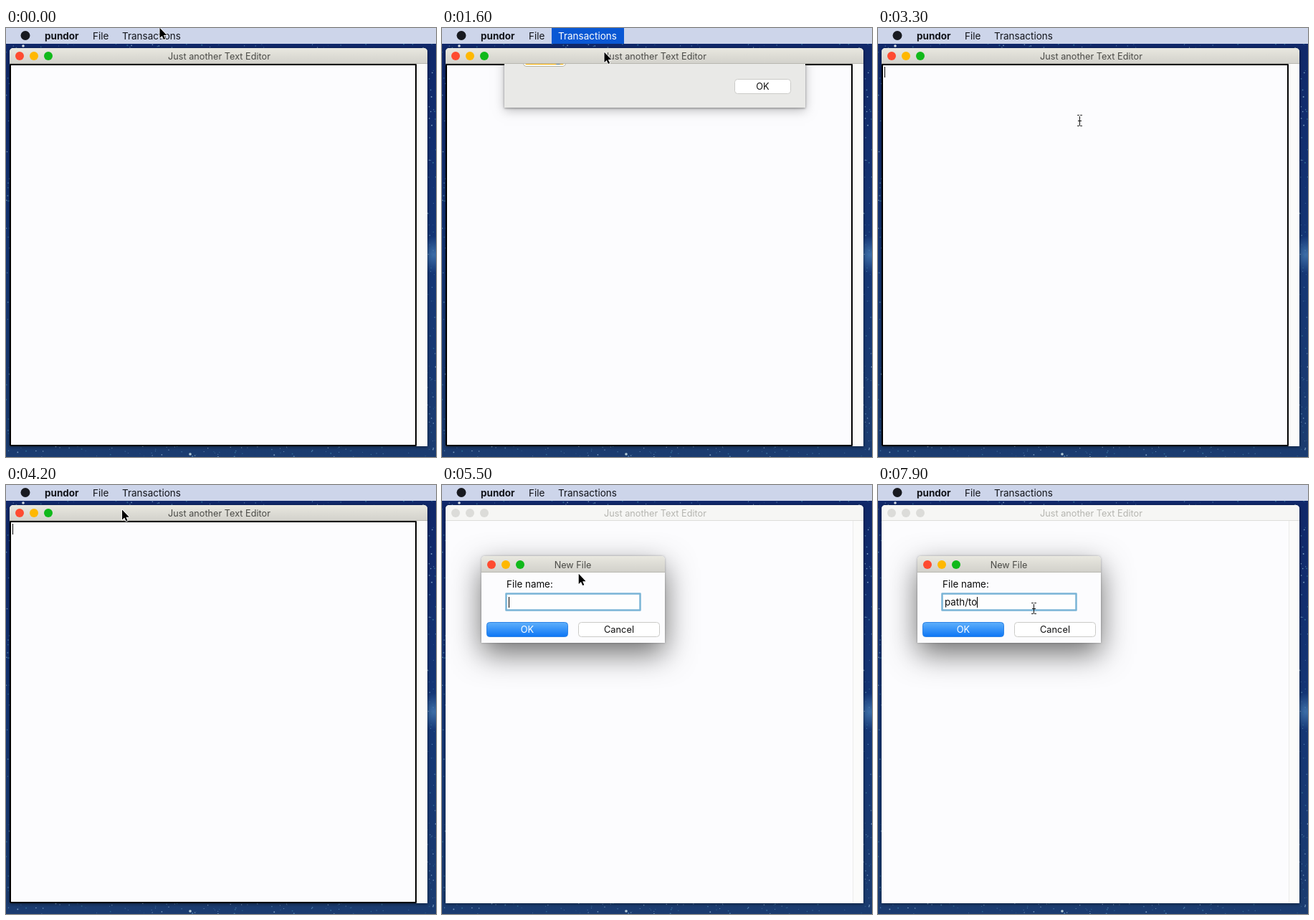
An HTML page with a canvas that plays this animation: 600 by 598 pixels, repeating every 8 s.

```html
<!DOCTYPE html>
<html lang="en">
<head>
<meta charset="utf-8">
<title>Text Editor</title>
<style>
  html, body { margin: 0; width: 100%; height: 100%; overflow: hidden; background: #14346f; }
  canvas { display: block; }
</style>
</head>
<body>
<canvas id="stage" width="600" height="598"></canvas>
<script>
const c = document.getElementById('stage').getContext('2d');
const LOOP = 8000, STEP = 100;

// Pointer stops: time, x, y
const path = [
  [0, 214, -1], [300, 214, 9], [600, 214, 9], [1000, 226, 33], [1900, 226, 33],
  [2500, 461, 153], [2800, 461, 153], [3300, 281, 129], [3700, 281, 129],
  [4400, 132, 10], [4600, 132, 10], [4800, 141, 33], [5200, 141, 33],
  [5700, 217, 172], [LOOP, 217, 172]
];
const typed = 'path/to', keyTimes = [5600, 5700, 5900, 6000, 7000, 7300, 7500];

const within = (t, from, to) => t >= from && t < to;
const clamp = v => Math.max(0, Math.min(1, v));

function pointerAt(t) {
  const i = path.findIndex(p => p[0] > t);
  const [t0, x0, y0] = path[i - 1], [t1, x1, y1] = path[i];
  const u = (t - t0) / (t1 - t0), e = u * u * (3 - 2 * u);
  return [x0 + (x1 - x0) * e, y0 + (y1 - y0) * e];
}

function rect(x, y, w, h, fill) {
  c.fillStyle = fill;
  c.fillRect(x, y, w, h);
}

function box(x, y, w, h, r, fill, stroke) {
  c.beginPath();
  c.roundRect(x, y, w, h, r);
  c.fillStyle = fill;
  c.fill();
  if (stroke) { c.strokeStyle = stroke; c.lineWidth = 1; c.stroke(); }
}

function dot(x, y, r, fill) {
  c.beginPath();
  c.arc(x, y, r, 0, 7);
  c.fillStyle = fill;
  c.fill();
}

function text(s, x, y, size, fill, align = 'left', weight = 400) {
  c.font = `${weight} ${size}px Inter, "Open Sans", sans-serif`;
  c.textAlign = align;
  c.fillStyle = fill;
  c.fillText(s, x, y);
}

function vertical(y0, y1, ...colors) {
  const g = c.createLinearGradient(0, y0, 0, y1);
  colors.forEach((col, i) => g.addColorStop(i / (colors.length - 1), col));
  return g;
}

function shadowed(color, blur, dy, draw) {
  c.save();
  c.shadowColor = color;
  c.shadowBlur = blur;
  c.shadowOffsetY = dy;
  draw();
  c.restore();
}

function sky() {
  rect(0, 0, 600, 598, vertical(22, 598, '#10286a', '#143676', '#1b3c70'));
  const glow = c.createRadialGradient(597, 316, 0, 597, 316, 26);
  glow.addColorStop(0, '#4a80b8c0');
  glow.addColorStop(1, '#4a80b800');
  rect(588, 285, 12, 62, glow);
  let seed = 11;
  const rnd = () => (seed = seed * 16807 % 2147483647) / 2147483647;
  for (let i = 0; i < 220; i++) {
    const side = rnd(), along = rnd(), across = rnd();
    const x = side < .2 ? across * 5 : side < .55 ? 588 + across * 12 : along * 600;
    const y = side < .55 ? 22 + along * 576 : side < .7 ? 22 + across * 6 : 583 + across * 15;
    dot(x, y, .4 + rnd() * .6, ['#2f6a94', '#4878a8', '#7a9cc0'][i % 3]);
  }
  dot(24, 25, 1.8, '#dce4ec');
  dot(257, 594, 1.8, '#b4ccd8');
}

function lights(x, y, colors) {
  colors.forEach((col, i) => dot(x + i * 20, y, 6, col));
}

const RED = '#ff4b30', AMBER = '#ffb800', GREEN = '#10b91a', OFF = '#dcdcd9';
const titleFill = y => vertical(y, y + 22, '#e9e8e0', '#dddcd5', '#d2d1cb');

function editor(focused, sheetUp, dialogUp) {
  shadowed('#00000080', 5, 1, () => box(5, 28, 583, 555, [5, 5, 0, 0], '#fcfcfe'));
  box(5, 28, 583, 22, [5, 5, 0, 0], dialogUp ? '#f6f6f4' : titleFill(28));
  rect(5, 49, 583, 1, dialogUp ? '#dededb' : '#b9b8b1');
  lights(19, 39, dialogUp ? [OFF, OFF, OFF] : [sheetUp ? '#cecdc8' : RED, AMBER, GREEN]);
  text('Just another Text Editor', 297.5, 44, 12.7, dialogUp ? '#b5b5b0' : '#4a4a46', 'center');
  rect(573, 50, 15, 533, '#fbfbfa');
  if (focused) {
    c.strokeStyle = '#000';
    c.lineWidth = 2;
    c.strokeRect(6, 51, 566, 531);
  } else rect(573, 50, 1, 533, '#ececea');
}

function menuBar(open) {
  rect(0, 0, 600, 22, '#cdd5ea');
  if (open === 'File') rect(112, 0, 41, 22, '#0a58d4');
  if (open === 'Transactions') rect(153, 0, 101, 22, '#0a58d4');
  dot(27, 10.5, 6.5, '#181a20');
  text('pundor', 54, 16, 13.5, '#12141a', 'left', 700);
  text('File', 121, 16, 13.5, open === 'File' ? '#fff' : '#12141a');
  text('Transactions', 162, 16, 13.5, open === 'Transactions' ? '#fff' : '#12141a');
}

function menu(x, w, items, hover) {
  const h = items.reduce((sum, s) => sum + (s ? 19 : 12), 9);
  shadowed('#00000048', 14, 4, () => box(x, 22, w, h, [0, 0, 5, 5], '#efefee'));
  box(x + .5, 22, w - 1, h - .5, [0, 0, 5, 5], '#efefee', '#c2c2c0');
  let y = 26;
  items.forEach((s, i) => {
    if (!s) { rect(x + 1, y + 6, w - 2, 1, '#d6d6d4'); y += 12; return; }
    if (i === hover) rect(x, y, w, 19, '#2b7eea');
    text(s, x + 21, y + 14, 13.4, i === hover ? '#fff' : '#1d1d1d');
    y += 19;
  });
}

function button(label, x, y, w, kind) {
  const fills = {
    plain: ['#ffffff', '#ffffff'],
    primary: ['#62b2fb', '#0a74f5'],
    pressed: ['#3a94f8', '#1555d8']
  };
  const border = { plain: '#cbcbc8', primary: '#2d83e6', pressed: '#1b55c0' };
  box(x + .5, y + .5, w - 1, 20, 4, vertical(y, y + 21, ...fills[kind]), border[kind]);
  text(label, x + w / 2, y + 15, 12.8, kind === 'plain' ? '#111' : '#fff', 'center');
}

function warning() {
  c.save();
  c.lineJoin = 'round';
  c.beginPath();
  c.moveTo(143, 75);
  c.lineTo(118, 119);
  c.lineTo(168, 119);
  c.closePath();
  c.strokeStyle = '#b4b2a6';
  c.lineWidth = 10;
  c.stroke();
  c.strokeStyle = '#fcfbf6';
  c.lineWidth = 8;
  c.stroke();
  c.strokeStyle = c.fillStyle = vertical(72, 122, '#ffdc28', '#ffcc14', '#ffb000');
  c.lineWidth = 4;
  c.stroke();
  c.fill();
  c.beginPath();
  c.moveTo(139.5, 86);
  c.quadraticCurveTo(143, 82, 146.5, 86);
  c.lineTo(144.6, 105);
  c.lineTo(141.4, 105);
  c.fillStyle = '#fff';
  c.fill();
  dot(143, 112, 3.2, '#fff');
  c.restore();
  dot(162, 113, 8, '#4f7faa');
}

function sheet(shown, okKind) {
  const panel = () => rect(87, 50, 420, 131, '#e9e9e7');
  c.save();
  c.beginPath();
  c.rect(5, 50, 583, 533);
  c.clip();
  c.translate(0, Math.round((shown - 1) * 131));
  shadowed('#00000040', 14, 4, panel);
  shadowed('#00000060', 3, 1, panel);
  rect(87, 50, 420, 5, vertical(50, 55, '#d3d3d0', '#e9e9e7'));
  warning();
  text('Transaction started', 193, 79, 13.2, '#0a0a0a', 'left', 700);
  button('OK', 408, 141, 79, okKind);
  c.restore();
}

function dialog(t) {
  const count = keyTimes.filter(k => k <= t).length;
  const since = t - (count ? keyTimes[count - 1] : 5200);
  shadowed('#00000090', 42, 15, () => box(55, 99, 256, 121, [5, 5, 0, 0], '#fcfcfe'));
  shadowed('#00000050', 3, 0, () => box(55, 99, 256, 121, [5, 5, 0, 0], '#fcfcfe'));
  box(55, 99, 256, 23, [5, 5, 0, 0], titleFill(99));
  rect(55, 121, 256, 1, '#b9b8b1');
  lights(69, 111, [RED, AMBER, GREEN]);
  text('New File', 182.5, 116, 12.7, '#4a4a46', 'center');
  text('File name:', 90, 143, 13.4, '#0a0a0a');
  c.strokeStyle = '#79b4d6';
  c.lineWidth = 2.5;
  c.strokeRect(89.5, 151.5, 187, 23);
  rect(91, 153, 184, 20, '#fefefe');
  const value = typed.slice(0, count);
  text(value, 93, 168, 13.4, '#0a0a0a');
  if (since % 900 < 600) rect(Math.round(93 + c.measureText(value).width), 156, 1, 15, '#000');
  button('OK', 62, 191, 114, 'primary');
  button('Cancel', 190, 191, 114, 'plain');
}

function arrow(x, y) {
  c.beginPath();
  [[.5, .8], [.5, 15], [3.7, 12], [6, 17], [8.1, 16.1], [5.9, 11.1], [10.3, 11.1]]
    .forEach(([dx, dy]) => c.lineTo(x + dx, y + dy));
  c.closePath();
  c.lineJoin = 'round';
  c.strokeStyle = '#fff';
  c.lineWidth = 1.6;
  c.stroke();
  c.fillStyle = '#000';
  c.fill();
}

function beam(x, y) {
  x = Math.round(x);
  y = Math.round(y);
  rect(x, y - 6, 1, 13, '#111');
  rect(x - 2, y, 5, 1, '#111');
  for (const dy of [-8, 7]) {
    rect(x - 3, y + dy, 3, 1, '#2a2a2a');
    rect(x + 1, y + dy, 3, 1, '#2a2a2a');
  }
}

function draw(t) {
  const shown = t < 2200 ? clamp((t - 1450) / 320) : clamp((3000 - t) / 220);
  const sheetUp = within(t, 1800, 3000), dialogUp = t >= 5200;
  const open = within(t, 500, 1700) ? 'Transactions' : within(t, 4500, 5100) ? 'File' : '';
  const [x, y] = pointerAt(t);

  sky();
  editor(!sheetUp && !dialogUp, sheetUp, dialogUp);
  if (within(t, 3100, 5200) && (t - 3100) % 900 < 600) rect(9, 54, 1, 15, '#000');
  if (shown > 0) sheet(shown, t < 1800 ? 'plain' : t < 2600 ? 'primary' : 'pressed');
  menuBar(open);
  const hover = y > 25 ? 0 : -1;
  if (open === 'Transactions' && t < 1400) menu(153, 106, ['Start', 'Commit', 'Rollback'], hover);
  if (open === 'File') menu(112, 86, ['New', 'Open...', 'Save', '', 'Exit'], hover);
  if (dialogUp) dialog(t);

  const overText = within(t, 3000, 4500) && y > 52;
  const overField = dialogUp && x > 89 && y > 151;
  (overText || overField ? beam : arrow)(x, y);
}

function tick() {
  draw(Math.floor(performance.now() % LOOP / STEP) * STEP);
  requestAnimationFrame(tick);
}
tick();
</script>
</body>
</html>
```
